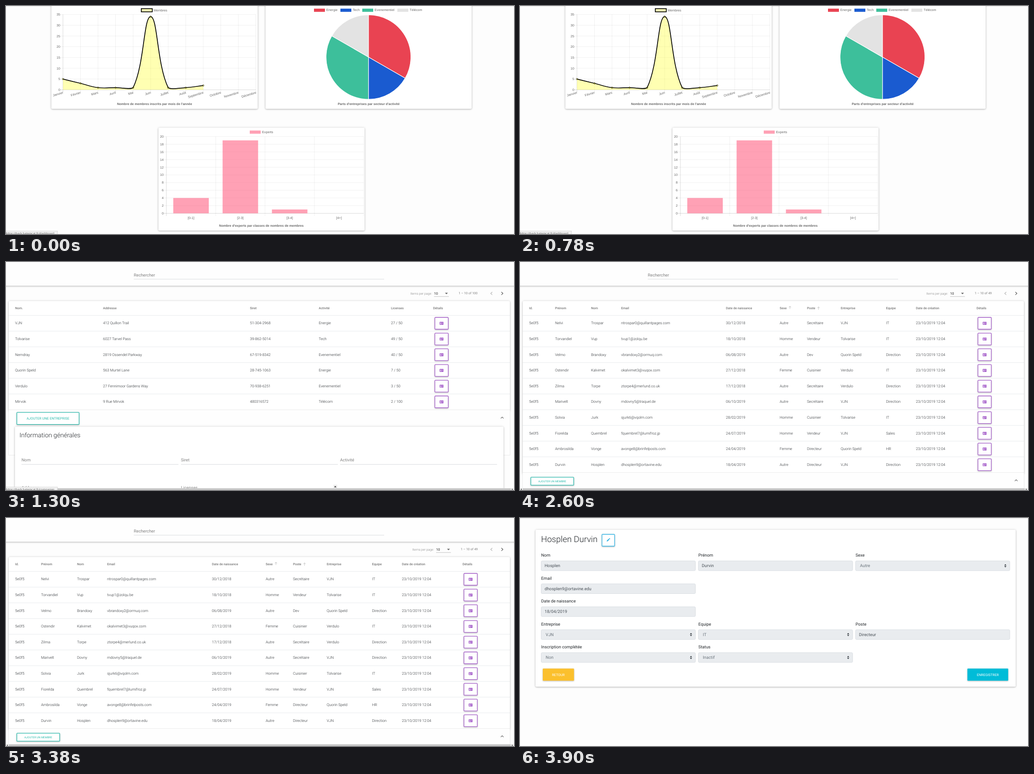
Recreate the animation shown at these times as an HTML page. Size 1115 px wide and 502 px high, loop 5.2 s.

```html
<!DOCTYPE html>
<html lang="fr">
<head>
<meta charset="utf-8">
<title>Tableau de bord</title>
<style>
html, body { margin: 0; width: 100%; height: 100%; overflow: hidden; background: #fdfdfd; }
svg { display: block; width: 100vw; height: 100vh; font-family: Roboto, sans-serif; text-rendering: geometricPrecision; }
.chart { font-family: "Liberation Sans", Arial, sans-serif; }
.status { font-family: "Open Sans", "Noto Sans", sans-serif; }
.card { filter: drop-shadow(0 1.2px 1.6px rgba(0,0,0,.24)) drop-shadow(0 .6px 2.4px rgba(0,0,0,.12)); }
.btn { filter: drop-shadow(0 1.2px 1.5px rgba(0,0,0,.28)); }
</style>
</head>
<body>
<svg id="stage" viewBox="0 0 1115 502" preserveAspectRatio="none"></svg>
<script>
const SCENE_MS = 1300;
const GRID = 'rgba(0,0,0,.1)', AXIS = 'rgba(0,0,0,.25)';
const PURPLE = '#a45cc9', TEAL = '#2bbbad', GREY = '#808080', INK = '#212529';

const attrs = o => Object.entries(o).map(([k, v]) => `${k}="${v}"`).join(' ');
const rect = (x, y, w, h, fill, more = {}) =>
  `<rect ${attrs({ x, y, width: w, height: h, fill, ...more })}/>`;
const line = (x1, y1, x2, y2, stroke, width = .58) =>
  `<line ${attrs({ x1, y1, x2, y2, stroke, 'stroke-width': width })}/>`;
const path = (d, fill, stroke = 'none', width = 1) =>
  `<path ${attrs({ d, fill, stroke, 'stroke-width': width })}/>`;
const text = (x, y, str, size, fill, more = {}) =>
  `<text ${attrs({ x, y, 'font-size': size, fill, ...more })}>${str}</text>`;
const centered = { 'text-anchor': 'middle' }, ended = { 'text-anchor': 'end' };
const card = (x, y, w, h) => rect(x, y, w, h, '#fff', { rx: 2.3, class: 'card' });
const group = (body, cls) => `<g class="${cls}">${body}</g>`;

// Charts
const label = (x, y, str, more) => text(x, y, str, 7.2, '#666', more);
const caption = (x, y, str) => text(x, y, str, 7.06, '#666', { ...centered, 'font-weight': 700 });
const legend = (x, y, str, fill) => rect(x, y, 24, 7, fill) + label(x + 27, y + 5.6, str);

function yAxis(x0, x1, top, bottom, max, step) {
  let s = '';
  for (let v = 0; v <= max; v += step) {
    const y = bottom - (bottom - top) * v / max;
    s += line(x0 - 5.8, y, x1, y, v ? GRID : AXIS) + label(x0 - 6, y + 2.5, v, ended);
  }
  return s;
}

function splinePath(pts, box) {
  const clampX = v => Math.min(box.right, Math.max(box.left, v));
  const clampY = v => Math.min(box.bottom, Math.max(box.top, v));
  const handles = pts.map((p, i) => {
    const a = pts[i - 1] || p, b = pts[i + 1] || p;
    const da = Math.hypot(p[0] - a[0], p[1] - a[1]), db = Math.hypot(b[0] - p[0], b[1] - p[1]);
    const at = k => [clampX(p[0] + k * (b[0] - a[0])), clampY(p[1] + k * (b[1] - a[1]))];
    return { before: at(-.4 * da / (da + db)), after: at(.4 * db / (da + db)) };
  });
  return pts.map((p, i) => i
    ? `C${handles[i - 1].after} ${handles[i].before} ${p}` : `M${p}`).join('');
}

function lineChart() {
  const box = { left: 125, right: 548.5, top: 18.6, bottom: 184.5 };
  const months = ['Janvier', 'Février', 'Mars', 'Avril', 'Mai', 'Juin', 'Juillet', 'Août',
    'Septembre', 'Octobre', 'Novembre', 'Décembre'];
  const stepX = (box.right - box.left) / 11;
  const pts = [5, 3, 1, 1, 1, 34, 1, 1, 2].map((v, i) =>
    [box.left + i * stepX, box.bottom - (box.bottom - box.top) * v / 35]);
  const curve = splinePath(pts, box);
  let s = card(99.5, -10, 453, 236.5);
  s += rect(297, 5.8, 24, 7, '#ffffb3', { stroke: '#000', 'stroke-width': 1.74 }) + label(324, 11.6, 'Membres');
  s += yAxis(box.left, box.right, box.top, box.bottom, 35, 5);
  months.forEach((m, i) => {
    const x = box.left + i * stepX;
    s += line(x, box.top, x, box.bottom + 5.8, i ? GRID : AXIS);
    s += label(x + 1, 192.6, m, { ...ended, transform: `rotate(-17 ${x + 1} 192.6)` });
  });
  s += path(`${curve}V${box.bottom}H${box.left}Z`, 'rgba(255,255,0,.3)');
  s += path(curve, 'none', '#000', 1.74);
  for (const [cx, cy] of pts)
    s += `<circle ${attrs({ cx, cy, r: 1.74, fill: 'rgba(255,255,0,.3)', stroke: '#000', 'stroke-width': .58 })}/>`;
  return s + caption(326, 217.6, "Nombre de membres inscrits par mois de l'année");
}

function pieChart() {
  const cx = 795.6, cy = 112.4, r = 93;
  const at = deg => {
    const a = deg * Math.PI / 180;
    return [cx + r * Math.sin(a), cy - r * Math.cos(a)];
  };
  const parts = [
    ['Energie', '#e94352', 676, 0, 120], ['Tech', '#1a5bd0', 734, 120, 180],
    ['Evenementiel', '#3dbf9b', 782, 180, 300], ['Télécom', '#e3e3e3', 859, 300, 360]];
  let s = card(569.5, -10, 452.5, 236.5);
  for (const [name, color, x, from, to] of parts) {
    s += legend(x, 5.8, name, color);
    s += path(`M${cx} ${cy}L${at(from)}A${r} ${r} 0 0 1 ${at(to)}Z`, color, '#fff', 1.16);
  }
  return s + caption(796, 217.6, "Parts d'entreprises par secteur d'activité");
}

function barChart() {
  const left = 352, right = 785, top = 287.4, bottom = 456.5, w = (right - left) / 4;
  let s = card(334.5, 268, 452.5, 226.5) + legend(535, 274.2, 'Experts', '#ffa1b5');
  s += yAxis(left, right, top, bottom, 20, 2);
  for (let i = 0; i < 5; i++) s += line(left + i * w, top, left + i * w, bottom + 5.8, i ? GRID : AXIS);
  [['[0-1]', 4], ['[2-3]', 19], ['[3-4]', 1], ['[4+]', 0]].forEach(([name, v], i) => {
    const mid = left + (i + .5) * w, h = (bottom - top) * v / 20;
    s += rect(mid - .36 * w, bottom - h, .72 * w, h, 'rgba(255,99,132,.6)') + label(mid, 468.6, name, centered);
  });
  return s + caption(560.5, 486, "Nombre d'experts par classes de nombres de membres");
}

const statusBar = page =>
  rect(-1, 495.3, 114, 8, '#f3f3f3', { stroke: '#c4c4c4', 'stroke-width': .58 }) +
  group(text(-.5, 503.4, 'https://back.batemcat.fr/' + page, 6.4, '#505050'), 'status');

const dashboard = () => line(0, .4, 1115, .4, '#dedede', .8) +
  group(lineChart() + pieChart() + barChart(), 'chart') + statusBar('dashboard');

// Lists
const outlined = (x, y, w, h, color) =>
  rect(x, y, w, h, '#fff', { rx: 1.2, stroke: color, 'stroke-width': 1.3, class: 'btn' });
const button = (x, y, w, h, str, size) => outlined(x, y, w, h, TEAL) +
  text(x + w / 2, y + h / 2 + size * .36, str, size, TEAL, centered);
const chevron = (x, y, dx, dy, color) => path(dx
  ? `M${x - dx} ${y - 3.2}l${2 * dx} 3.2l${-2 * dx} 3.2` : `M${x - 3} ${y + dy}l3 ${-2 * dy}l3 ${2 * dy}`,
  'none', color, 1.2);

function detailButton(x, y) {
  return outlined(x - 14.6, y - 13, 29.2, 26, PURPLE) +
    rect(x - 4.2, y - 3.2, 8.4, 6.4, PURPLE, { rx: .7 }) +
    `<circle cx="${x - 1.7}" cy="${y - 1}" r=".95" fill="#fff"/>` +
    path(`M${x - 3.3} ${y + 1.8}q0-1.5 1.6-1.5t1.6 1.5z`, '#fff') +
    line(x + .9, y - 1.1, x + 3.2, y - 1.1, '#fff', .6) + line(x + .9, y + .5, x + 3.2, y + .5, '#fff', .6);
}

const searchBar = () => rect(-10, -10, 1135, 62.3, '#fefefe', { class: 'card' }) +
  text(280.5, 31.8, 'Rechercher', 9.29, GREY) + line(280.5, 37.8, 830, 37.8, '#c9ccd0', .7);

function paginator(x, count) {
  return text(x, 71.5, 'Items per page:', 6.97, '#7c7c7c', { 'font-weight': 300 }) +
    text(x + 52, 71.7, '10', 7.5, '#222') + line(x + 52, 76, x + 84.5, 76, '#8f8f8f') +
    path(`M${x + 76} 67.7h6.4l-3.2 3.2z`, '#666') +
    text(x + 106, 71.3, `1 – 10 of ${count}`, 6.97, '#7c7c7c') +
    chevron(1065.6, 69.2, -1.7, 0, '#b5b5b5') + chevron(1089, 69.2, 1.7, 0, '#555');
}

function table(columns, rows, iconX) {
  const rowH = 34.6, top = 117.6, end = top + rows.length * rowH;
  let s = card(6, 86, 1100, end - 86 + 3);
  for (const [x, name] of columns)
    s += text(x, 103.7, name, 7, '#757575', { 'font-weight': 500 });
  rows.forEach((row, i) => {
    const y = top + i * rowH;
    s += line(6, y, 1106, y, '#dfe2e5', .7);
    row.forEach((cell, j) => s += text(columns[j][0], y + 19.7, cell, 8.13, INK, { 'font-weight': 300 }));
    s += detailButton(iconX, y + 17.4);
  });
  return s + rect(5.7, end, 1100.6, 100, '#fefefe', { stroke: '#dedede', 'stroke-width': .6 });
}

const scrollBar = () => rect(0, 497.8, 1115, 5, '#f1f1f1') + rect(6, 498.2, 1102, 4, '#c8c8c8') +
  path('M4 498.6v4l-2.4-2z', '#505050') + path('M1110.4 498.6v4l2.4-2z', '#505050');

function companies() {
  const columns = [[20, 'Nom.'], [213, 'Addresse'], [535.5, 'Siret'], [686.5, 'Activité'], [845, 'Licenses'], [937.5, 'Détails']];
  const rows = [
    ['VJN', '412 Quillon Trail', '51-304-2968', 'Energie', '27 / 50'],
    ['Tolvarise', '6027 Tarvel Pass', '39-862-5014', 'Tech', '49 / 50'],
    ['Nemdray', '2819 Ossendel Parkway', '67-519-8342', 'Evenementiel', '40 / 50'],
    ['Quorin Speld', '563 Murtel Lane', '28-745-1063', 'Energie', '7 / 50'],
    ['Verdulo', '27 Fennimoor Gardens Way', '70-938-6251', 'Evenementiel', '3 / 50'],
    ['Mirvok', '9 Rue Mirvok', '480316572', 'Télécom', '2 / 100']];
  let s = searchBar() + paginator(887.5, 100) + table(columns, rows, 956);
  s += button(23.8, 331.2, 136.6, 26.4, 'AJOUTER UNE ENTREPRISE', 7.53) + chevron(1089, 342.8, 0, 1.5, '#666');
  s += card(19.5, 362.5, 1072.5, 160);
  s += text(29.5, 386, 'Information générales', 13.94, INK, { 'font-weight': 300 });
  [[34, 'Nom'], [384, 'Siret'], [733.3, 'Activité']].forEach(([x, name]) =>
    s += text(x, 438.6, name, 9.29, GREY) + line(x, 445.6, x + 344.5, 445.6, '#c9ccd0', .7));
  s += text(34, 499.6, 'Addresse', 9.29, GREY) + text(384, 499.6, 'Licenses', 9.29, GREY);
  s += rect(718.5, 490.5, 8.5, 8, '#ececec') + path('M720.3 496l2.4-3l2.4 3z', '#333');
  return s + scrollBar() + statusBar('companies');
}

function members() {
  const columns = [[20, 'Id.'], [77, 'Prénom'], [156, 'Nom'], [222, 'Email'], [452, 'Date de naissance'],
    [570, 'Sexe'], [630, 'Poste'], [704, 'Entreprise'], [803.5, 'Equipe'], [869, 'Date de création'], [1002, 'Détails']];
  const people = [
    ['Nelvi', 'Trospar', 'ntrospar0@quillantpages.com', '30/12/2018', 'Autre', 'Secrétaire', 'VJN', 'IT'],
    ['Torvandiel', 'Vup', 'tvup1@zolqu.be', '18/10/2018', 'Homme', 'Vendeur', 'Tolvarise', 'IT'],
    ['Velmo', 'Brandoxy', 'vbrandoxy2@ormuq.com', '06/08/2019', 'Autre', 'Dev', 'Quorin Speld', 'Direction'],
    ['Ostendir', 'Kalvimet', 'okalvimet3@vuqox.com', '27/12/2018', 'Femme', 'Cuisinier', 'Verdulo', 'IT'],
    ['Zilma', 'Torpe', 'ztorpe4@merlund.co.uk', '17/12/2018', 'Autre', 'Secrétaire', 'Verdulo', 'Direction'],
    ['Marivelt', 'Dovny', 'mdovny5@traquel.de', '06/10/2019', 'Autre', 'Secrétaire', 'VJN', 'Direction'],
    ['Solvia', 'Jurk', 'sjurk6@vqolm.com', '28/02/2019', 'Homme', 'Cuisinier', 'Tolvarise', 'IT'],
    ['Fiorelda', 'Quembrel', 'fquembrel7@lumifroz.jp', '24/07/2019', 'Homme', 'Vendeur', 'VJN', 'Sales'],
    ['Ambrosilda', 'Vonge', 'avonge8@brinfelposts.com', '24/04/2019', 'Femme', 'Directeur', 'Quorin Speld', 'HR'],
    ['Durvin', 'Hosplen', 'dhosplen9@ortavine.edu', '18/04/2019', 'Autre', 'Directeur', 'VJN', 'Direction']];
  const rows = people.map(p => ['5e0f5', ...p, '23/10/2019 12:04']);
  let s = searchBar() + paginator(892, 49) + table(columns, rows, 1019.8);
  [[592.5, 100], [655.2, 101.5]].forEach(([x, y]) =>
    s += path(`M${x} ${y + 3.3}v-6M${x - 2.5} ${y - .3}l2.5-2.5l2.5 2.5`, 'none', '#bcbcbc', .9));
  s += button(23.8, 473.8, 94, 17.6, 'AJOUTER UN MEMBRE', 5.95) + chevron(1089, 480.8, 0, 1.5, '#666');
  return s + scrollBar();
}

// Member form
function field(col, row, name, value, select) {
  const x = 46.5 + col * 345, y = 94.4 + row * 50.5;
  let s = text(x, y - 9.2, name, 9.29, INK);
  s += rect(x, y, 338.6, 21.6, '#e9ecef', { rx: 2.3, stroke: '#ced4da', 'stroke-width': .7 });
  s += text(x + (select ? 9.8 : 7.5), y + 14, value, 9.29, select ? '#6c757d' : '#495057');
  if (select) s += path(`M${x + 326.4} ${y + 10.1}l2.4-2.9l2.4 2.9zM${x + 326.4} ${y + 11.5}l2.4 2.9l2.4-2.9z`, '#343a40');
  return s;
}

const filled = (x, w, str, fill) => rect(x, 331.4, w, 26.8, fill, { rx: 1.2, class: 'btn' }) +
  text(x + w / 2, 347.5, str, 7.53, '#fff', centered);

function profile() {
  const blue = '#33b5e5';
  let s = line(0, .4, 1115, .4, '#dedede', .8) + card(34, 26, 1054, 345.5);
  s += text(46.3, 53, 'Hosplen Durvin', 18.58, INK, { 'font-weight': 300 });
  s += outlined(180, 36, 27.6, 26, blue);
  s += path('M190.3 51.7l.5-2.2l3.7-3.7l1.7 1.7l-3.7 3.7zM195 45.3l.9-.9q.5-.4 1 0l.8.8q.4.5 0 1l-.9.9z', blue);
  s += field(0, 0, 'Nom', 'Hosplen') + field(1, 0, 'Prénom', 'Durvin') + field(2, 0, 'Sexe', 'Autre', true);
  s += field(0, 1, 'Email', 'dhosplen9@ortavine.edu') + field(0, 2, 'Date de naissance', '18/04/2019');
  s += field(0, 3, 'Entreprise', 'VJN', true) + field(1, 3, 'Equipe', 'IT', true) + field(2, 3, 'Poste', 'Directeur');
  s += field(0, 4, 'Inscription complétée', 'Non', true) + field(1, 4, 'Status', 'Inactif', true);
  return s + filled(50, 68.5, 'RETOUR', '#fbc02d') + filled(982, 89.5, 'ENREGISTRER', '#00bcd8');
}

const stage = document.getElementById('stage');
stage.innerHTML = rect(0, 0, 1115, 502, '#fdfdfd') +
  [dashboard, companies, members, profile].map(scene => group(scene(), 'scene')).join('');
const scenes = [...stage.querySelectorAll('.scene')];

function show(ms) {
  const current = Math.floor(ms / SCENE_MS) % scenes.length;
  scenes.forEach((g, i) => g.setAttribute('display', i === current ? 'inline' : 'none'));
}

const start = performance.now();
function tick() {
  show(performance.now() - start);
  requestAnimationFrame(tick);
}
tick();
</script>
</body>
</html>
```
